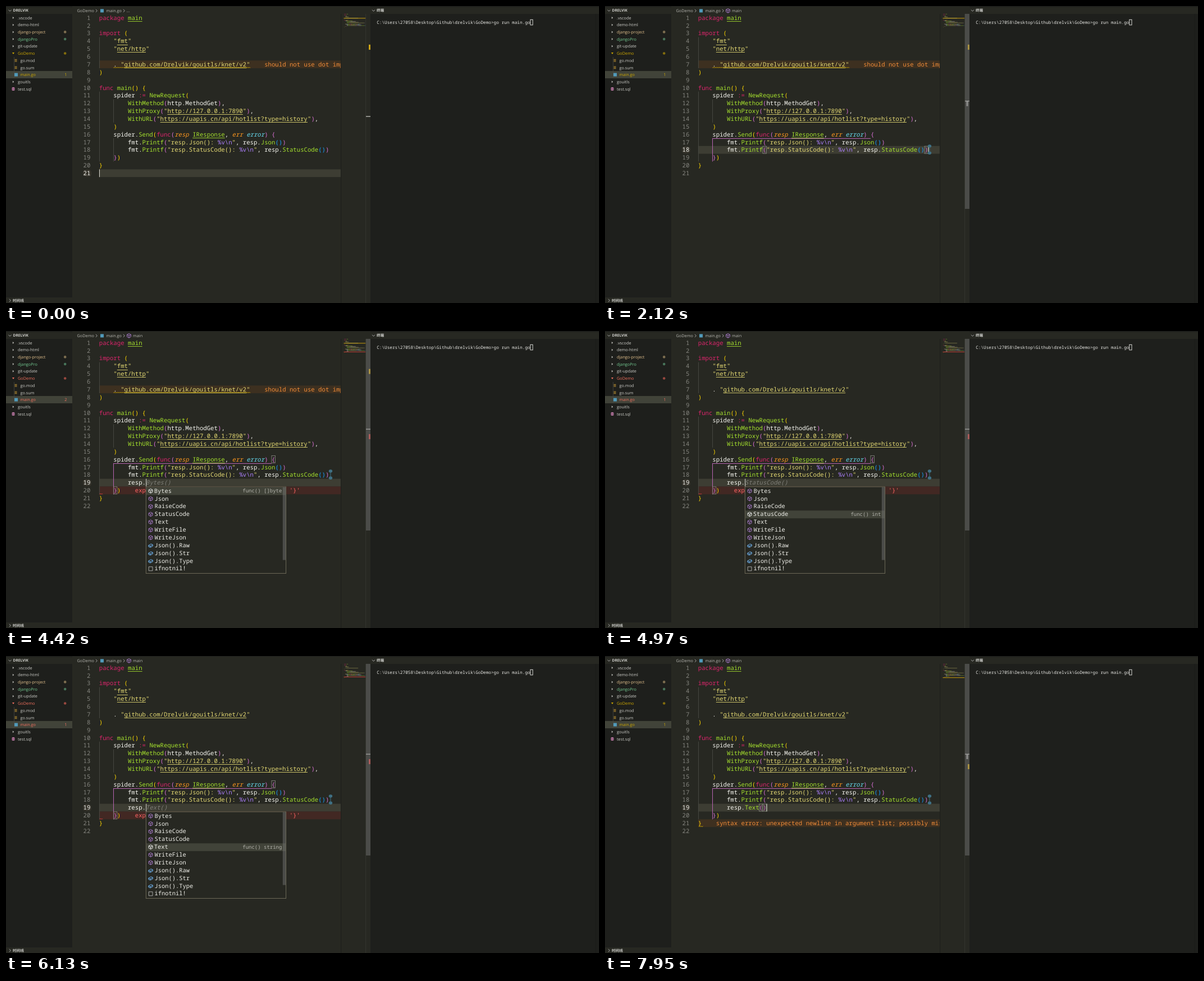
An HTML page for the animation above (8 s loop, 1056 by 530 pixels).

```html
<!DOCTYPE html>
<html lang="en">
<head>
<meta charset="utf-8">
<title>Editor session</title>
<style>
  html, body { margin: 0; width: 100%; height: 100%; overflow: hidden; background: #1e1f1c; }
  #stage { display: block; width: 1056px; height: 530px; }
  text { white-space: pre; text-rendering: geometricPrecision; font-variant-ligatures: none; }
  .code { font: 10.667px "Noto Sans Mono", "DejaVu Sans Mono", monospace; }
  .item { font: 10.42px "Noto Sans Mono", "DejaVu Sans Mono", monospace; }
  .detail { font: 8.97px "Noto Sans Mono", monospace; }
  .term { font: 7.72px "Noto Sans Mono", monospace; }
  .ui { font: 7.3px "Open Sans", "Noto Sans", sans-serif; }
  .head { font: bold 6.6px "Open Sans", "Noto Sans CJK SC", "Noto Sans CJK", sans-serif; }
  .note { font-weight: 500; }
  .italic { font-style: italic; }
  .bold { font-weight: bold; }
</style>
</head>
<body>
<svg id="stage" viewBox="0 0 1056 530"></svg>
<script>
const LOOP = 8000, X0 = 165.8, CW = 6.4, TOP = 14, LH = 13.87;
const COLOR = { k: '#dc256c', g: '#a6e22e', s: '#e6db74', w: '#f8f8f2', y: '#ffd700', o: '#da70d6',
  b: '#179fff', v: '#ae81ff', p: '#fd971f', t: '#66d9ef' };
const GOLD = '#cca700', RED = '#f1705f', ORANGE = '#f28c38', TEAL = '#519aba', PAIR = '#b865b3';

// Segments start with a colour key; an upper-case key is underlined.
const SOURCE = [
  'kpackage ¦Gmain', '', 'kimport ¦y(', 'w    ¦s"¦Sfmt¦s"', 'w    ¦s"¦Snet/http¦s"', '',
  'w    . ¦s"¦Sgithub.com/Drelvik/gouitls/knet/v2¦s"', 'y)', '',
  'kfunc ¦gmain¦y() {',
  'w    spider ¦k:=¦w ¦gNewRequest¦y(',
  'w        ¦gWithMethod¦o(¦whttp.MethodGet¦o)¦w,',
  'w        ¦gWithProxy¦o(¦s"¦Shttp://127.0.0.1:7890¦s"¦o)¦w,',
  'w        ¦gWithURL¦o(¦s"¦Shttps://uapis.cn/api/hotlist?type=history¦s"¦o)¦w,',
  'w    ¦y)',
  'w    spider.¦gSend¦y(¦kfunc¦o(¦presp¦w ¦GIResponse¦w, ¦perr¦w ¦terror¦o) {',
  'w        fmt.¦gPrintf¦o(¦s"resp.Json(): ¦v%v\\n¦s"¦w, resp.¦gJson¦b()¦o)',
  'w        fmt.¦gPrintf¦o(¦s"resp.StatusCode(): ¦v%v\\n¦s"¦w, resp.¦gStatusCode¦b()¦o)',
  'w    ¦o}¦y)', 'y}', ''
];

const WORDS = ['var resp', 'struct Response', 'struct http.Response', 'struct http.ResponseController',
  'iface http.ResponseWriter', 'mod resolver', 'mod resource', 'mod restartmanager', 'mod resty',
  'mod resumable', 'iface IResponse'];
const MEMBERS = ['cube Bytes', 'cube Json', 'cube RaiseCode', 'cube StatusCode', 'cube Text', 'cube WriteFile',
  'cube WriteJson', 'field Json().Raw', 'field Json().Str', 'field Json().Type', 'snip ifnotnil!'];
const DETAILS = ['func() []byte', 'func() gjson.Result', 'func() error', 'func() int', 'func() string',
  'func(fileName string, perm s…', 'func(fileName string, perm s…'];

const select = sel => ({ sel, ghost: MEMBERS[sel].split(' ')[1] + '()' });
const STEPS = [
  [0, { line: 21, col: 0, total: 21, text: '', ghost: '', crumb: false, mouse: false, slider: 0, warn7: true,
    undef: false, err20: false, warn21: false, popup: '', sel: 0, red: false, count: 1, boxes: [] }],
  [160, { slider: .3 }], [200, { slider: .65 }], [240, { slider: 1 }],
  [800, { mouse: true }],
  [1200, { line: 18, col: 64, boxes: [[18, 18], [18, 63]] }],
  [1500, { crumb: true }],
  [2350, { total: 22, line: 19, col: 8, boxes: [[16, 48], [20, 4]] }],
  [2820, { text: 'r', col: 9 }],
  [2980, { text: 're', col: 10 }],
  [3130, { text: 'res', col: 11, popup: 'words' }],
  [3250, { ghost: 'p' }],
  [3370, { red: true, count: 2, undef: true }],
  [3650, { text: 'resp', col: 12, ghost: '' }],
  [3790, { text: 'resp.', col: 13, popup: '', undef: false }],
  [3900, { popup: 'members', ...select(0) }],
  [3980, { err20: true }],
  [4510, { warn7: false, count: 1 }],
  [4600, select(1)], [4740, select(2)], [4880, select(3)], [5020, select(4)],
  [5200, select(5)], [5380, select(6)],
  [5940, select(5)], [6060, select(4)],
  [6270, { warn21: true, count: 2 }],
  [7000, { text: 'resp.Text()', col: 19, ghost: '', popup: '', boxes: [[19, 17], [19, 18]] }],
  [7200, { err20: false }],
  [7350, { red: false, count: 1 }]
];
const CARET_OFF = [[2020, 2120], [4140, 4320], [6420, 7000], [7600, 7900]];

const rect = (x, y, w, h, fill, more = '') => `<rect x="${x}" y="${y}" width="${w}" height="${h}" fill="${fill}" ${more}/>`;
const text = (x, y, str, fill, cls, more = '') => `<text x="${x}" y="${y}" fill="${fill}" class="${cls}" ${more}>${str}</text>`;
const path = (d, stroke, width = 1, fill = 'none') => `<path d="${d}" fill="${fill}" stroke="${stroke}" stroke-width="${width}"/>`;
const dot = (x, y, r, fill) => `<circle cx="${x}" cy="${y}" r="${r}" fill="${fill}"/>`;
const END = 'text-anchor="end"';
const colX = col => X0 + col * CW;
const rowY = line => TOP + (line - 1) * LH;
const codeAt = (line, col, str, fill, cls = '') => text(colX(col), rowY(line) + 10.7, str, fill, 'code ' + cls);
const chevron = (x, y, down) => path(down ? `M${x - 2.5} ${y - 1.2}l2.5 2.6l2.5-2.6` : `M${x - 1.2} ${y - 2.5}l2.6 2.5l-2.6 2.5`, '#c5c5c5', .8);

function squiggle(x, end, y, color) {
  let d = `M${x} ${y}`;
  for (let i = 0; x + i * 1.4 < end; i++) d += `l1.4 ${i % 2 ? 1.6 : -1.6}`;
  return path(d, color, .8);
}

function icon(kind, x, y, bright) {
  const tint = c => bright ? '#fff' : c;
  const violet = tint('#b180d7'), blue = tint('#75beff'), gray = tint('#c5c5c5');
  switch (kind) {
    case 'cube': return path(`M${x} ${y - 3.8}l3.4 1.8v3.8l-3.4 1.9l-3.4-1.9v-3.8zM${x - 3.4} ${y - 2}l3.4 1.8l3.4-1.8M${x} ${y - .2}v3.9`, violet, .9);
    case 'field': return path(`M${x - 3.8} ${y}l4.4-2.6l3.2 1.4v2.4l-4.4 2.4l-3.2-1.4zM${x - 3.8} ${y}l3.2 1.4l4.4-2.4M${x - .6} ${y + 1.4}v2`, blue, .9);
    case 'iface': return path(`M${x - 1.5} ${y}h3`, blue, .9) + dot(x - 2.8, y, 1.5, blue) +
      `<circle cx="${x + 2.4}" cy="${y}" r="1.7" fill="none" stroke="${blue}" stroke-width=".9"/>`;
    case 'struct': return path(`M${x - 3.8} ${y - 3.2}h7.4v2.4h-7.4zM${x - 3.8} ${y + 1}h2.6v2.4h-2.6zM${x + 1} ${y + 1}h2.6v2.4h-2.6z`, gray, .8);
    case 'mod': return text(x - 4.4, y + 2.6, '{}', gray, 'term');
    case 'var': return text(x - 6, y + 2.4, '[ø]', gray, 'term bold', 'style="font-size:7px"');
    default: return path(`M${x - 3.4} ${y - 3.4}h6.8v7h-6.8z`, gray, .8);
  }
}

function sidebar(s) {
  const tone = s.red ? RED : GOLD;
  const rows = [['.vscode'], ['demo-html'], ['django-project', '#e2c08d', '#7d6e50'], ['djangoPro', '#73c991', '#48755a'],
    ['git-update'], ['GoDemo', tone, s.red ? '#98483f' : '#836d0c'], ['go.mod'], ['go.sum'], ['main.go', tone], ['gouitls'], ['test.sql']];
  let out = rect(0, 0, 118, 530, '#1e1f1c') + rect(0, 2, 118, 12, '#272822') + rect(0, 520, 118, 10, '#272822') +
    chevron(7, 8, true) + text(12.5, 10.3, 'DRELVIK', '#d0d0cc', 'head') +
    chevron(7, 525.5) + text(12, 528, '时间线', '#d0d0cc', 'head') +
    rect(0, 116, 118, 13, '#414339') + rect(14, 91, .7, 38, '#4a4b45');
  rows.forEach(([name, color = '#ccccc7', badge], i) => {
    const y = 21 + i * 12.7, file = i > 5 && i < 9;
    out += text(file ? 25.5 : 21, y + 2.6, name, color, 'ui');
    if (badge) out += dot(105.2, y, 2.3, badge);
    if (i === 5) out += path(`M11 ${y - 1.4}h4l-2 3z`, 'none', 0, color);
    else if (i === 8) out += rect(15, y - 3, 6, 6, TEAL);
    else if (file) out += path(`M15.5 ${y - 1.8}h4M15.5 ${y}h4M15.5 ${y + 1.8}h4`, '#c99a35', .9);
    else if (i === 10) out += rect(10.5, y - 3, 5, 6, '#c07aa8', 'rx="1.5"') + path(`M10.5 ${y - .8}h5M10.5 ${y + 1.2}h5`, '#1e1f1c', .5);
    else out += path(`M11.8 ${y - 2}l2.6 2l-2.6 2z`, 'none', 0, '#b5b5b0');
  });
  return out + text(108.5, 125.3, s.count, tone, 'ui', END);
}

function breadcrumb(s) {
  return text(126.5, 11, 'GoDemo', '#b4b4ae', 'ui') + chevron(161, 8.5) + rect(168, 5.5, 6, 6, TEAL) +
    text(178.5, 11, 'main.go', '#b4b4ae', 'ui') + chevron(210, 8.5) +
    (s.crumb ? icon('cube', 219, 8.5) + text(226, 11, 'main', '#b4b4ae', 'ui') : text(214.5, 11, '...', '#b4b4ae', 'ui'));
}

function linesFor(s) {
  const lines = [...SOURCE];
  if (s.total === 22) {
    const [recv, call] = s.text.split('.');
    const member = call ? '.¦g' + call.replace('()', '¦o()') : call === '' ? '.' : '';
    lines.splice(18, 0, 'w        ' + recv + member);
  }
  return lines.map(line => {
    let col = 0;
    return line.split('¦').filter(Boolean).map(seg => {
      const key = seg[0].toLowerCase(), str = seg.slice(1), at = col;
      col += str.length;
      return { key, str, col: at, under: seg[0] !== key };
    });
  });
}

function editor(s, lines, caret) {
  const band = (line, color) => rect(X0, rowY(line), 431, LH, color);
  const closing = s.total - 2, active = s.line < 21;
  let out = band(s.line, s.undef ? '#573d35' : '#3d3d33') +
    rect(137, rowY(s.line) + .8, 15, 12.4, '#37352d', 'rx="5"');
  if (s.warn7) out += band(7, '#3d3020');
  if (s.err20) out += band(20, '#422823');
  if (s.warn21) out += band(21, '#3e3020');

  const guide = (col, from, to, color = '#464741') =>
    rect(Math.round(colX(col)), rowY(from), 1, (to - from + 1) * LH, color);
  out += guide(0, 4, 7) + guide(0, 11, closing) + guide(4, 12, 14) + guide(4, 17, closing, active ? PAIR : '#464741');
  if (active) out += rect(colX(4), rowY(17), CW * 44, 1, PAIR);

  lines.forEach((segs, i) => {
    const n = i + 1, here = n === s.line;
    out += text(150.3, rowY(n) + 10.7, n, here ? '#f0f0ea' : '#85857f', 'code' + (here ? ' note' : ''), END);
    for (const { key, str, col, under } of segs) {
      out += codeAt(n, col, str, COLOR[key], 'pt'.includes(key) ? 'italic' : '');
      if (under) out += rect(colX(col), Math.round(rowY(n) + 13), str.length * CW, 1, COLOR[key], 'opacity=".85"');
    }
  });
  for (const [line, col] of s.boxes) out += rect(colX(col), rowY(line) + .4, CW, 13, 'none', 'stroke="#8b8b84" stroke-width=".8"');

  if (s.ghost) out += codeAt(19, s.col, s.ghost, '#7f7f78', 'italic');
  if (s.warn7) out += squiggle(191.4, 434.5, 110.6, GOLD) + codeAt(7, 46, 'should not use dot imports', ORANGE, 'note');
  if (s.undef) out += squiggle(217, 236, 277, '#f04040') + codeAt(19, 16, 'undefined: res', '#ff6464', 'note');
  if (s.err20) out += squiggle(166.5, 172, 291.6, '#f04040') + codeAt(20, 10, "expected selector or type assertion, found '}'", '#ff6464', 'note');
  if (s.warn21) out += squiggle(167.5, 174, 305, GOLD) + codeAt(21, 5, 'syntax error: unexpected newline in argument list; possibly missing', ORANGE, 'note');
  if (caret) out += rect(colX(s.col) + .2, rowY(s.line), 1, LH, '#d8d8d0');
  if (s.mouse) out += '<g fill="#3f7084"><ellipse cx="578" cy="250" rx="3.2" ry="2.8"/><ellipse cx="578" cy="262.3" rx="3.2" ry="2.8"/><rect x="577.5" y="252" width="1" height="8"/></g>';
  return `<svg width="597" height="530">${out}</svg>`;
}

function margin(s, lines) {
  const pitch = 1.2;
  let out = rect(596, 14, 1.2, 516, '#1f201c');
  const stripe = (line, color) => rect(601.5, TOP + (line - 1) * pitch, 39, 1.2, color);
  if (s.warn7) out += stripe(7, '#b08a10');
  if (s.undef) out += stripe(19, '#8c3a34');
  if (s.err20) out += stripe(20, '#a83a34');
  if (s.warn21) out += stripe(21, '#b08a10');
  lines.forEach((segs, i) => segs.forEach(({ key, str, col }) => {
    const lead = str.length - str.trimStart().length, len = str.trim().length;
    if (len) out += rect(602 + (col + lead) * .6, TOP + i * pitch + .2, len * .6, .7, COLOR[key], 'opacity=".5"');
  }));

  const step = s.total === 21 ? 9.15 : 8.95;
  const mark = (line, color) => rect(646, TOP + (line - 1) * step, 3, step, color);
  out += rect(640.4, 14, .7, 516, '#3b3c36');
  if (s.warn7) out += mark(7, '#cca316');
  if (s.undef) out += mark(19, '#d04440');
  if (s.err20) out += mark(20, '#d04440');
  if (s.warn21) out += mark(21, '#cca316');
  const y = TOP + (s.line - 1) * step;
  if (s.boxes.some(([line]) => line === s.line)) out += rect(643.5, y, 3, step, '#a0a09c');
  out += rect(641, y - .5, 8, 1.2, '#d0d0ca');
  return out + rect(641, 14, 8, s.total === 21 ? 348 : 342, '#797979', `opacity="${s.slider * .45}"`);
}

function popup(s) {
  if (!s.popup) return '';
  const words = s.popup === 'words', x = words ? 236.5 : 249.3, y = 278;
  const typed = new RegExp(s.text, 'i');
  const items = words ? WORDS.filter(item => typed.test(item.split(' ')[1])) : MEMBERS;
  let out = rect(x, y, 249.3, items.length * LH + 2, '#272822', 'stroke="#75715e" stroke-width=".9"');
  items.forEach((item, i) => {
    let [kind, name] = item.split(' ');
    const top = y + .8 + i * LH, chosen = i === s.sel;
    if (chosen) {
      out += rect(x + .5, top, 248.3, LH, '#414339') +
        text(x + 242, top + 9.6, words ? 'IResponse' : DETAILS[i], '#b4b4ac', 'detail', END);
      if (!words && i > 4) name = name.slice(0, 7) + '…';
    }
    if (words) name = name.replace(typed, m => `<tspan class="bold" fill="#fff">${m}</tspan>`);
    out += icon(kind, x + 8.3, top + 6.7, chosen) +
      text(x + (chosen ? 14.4 : 15.2), top + 9.9, name, '#f0f0ea', 'item');
  });
  if (items.length > 10) out += rect(x + 243.5, y + .7, 5.4, words ? 112.5 : 130, '#797979', 'opacity=".45"');
  return out;
}

function terminal() {
  return rect(649, 0, 407, 530, '#1e1f1c') + rect(649, 2, 407, 12, '#272822') + rect(1050, 14, 1, 516, '#191a17') +
    chevron(654.5, 8, true) + text(660, 10.4, '终端', '#d8d8d4', 'head') +
    text(660.2, 31.6, 'C:\\Users\\27058\\Desktop\\Github\\drelvik\\GoDemo>go run main.go', '#e4e4e0', 'term') +
    rect(933.8, 24.3, 4.2, 9.6, 'none', 'stroke="#e8e8e4" stroke-width=".9"');
}

function render(s, caret) {
  const lines = linesFor(s);
  return rect(118, 0, 531, 530, '#272822') + rect(118, 0, 531, 1, '#1e1f1c') + sidebar(s) + breadcrumb(s) +
    editor(s, lines, caret) + margin(s, lines) + terminal() + popup(s);
}

const stage = document.getElementById('stage');
const start = performance.now();
let shown = '';
function tick() {
  const t = (performance.now() - start) % LOOP;
  const past = STEPS.filter(([at]) => at <= t);
  const caret = !CARET_OFF.some(([from, to]) => t >= from && t < to);
  const key = past.length + ':' + caret;
  if (key !== shown) {
    stage.innerHTML = render(Object.assign({}, ...past.map(([, change]) => change)), caret);
    shown = key;
  }
  requestAnimationFrame(tick);
}
tick();
</script>
</body>
</html>
```
